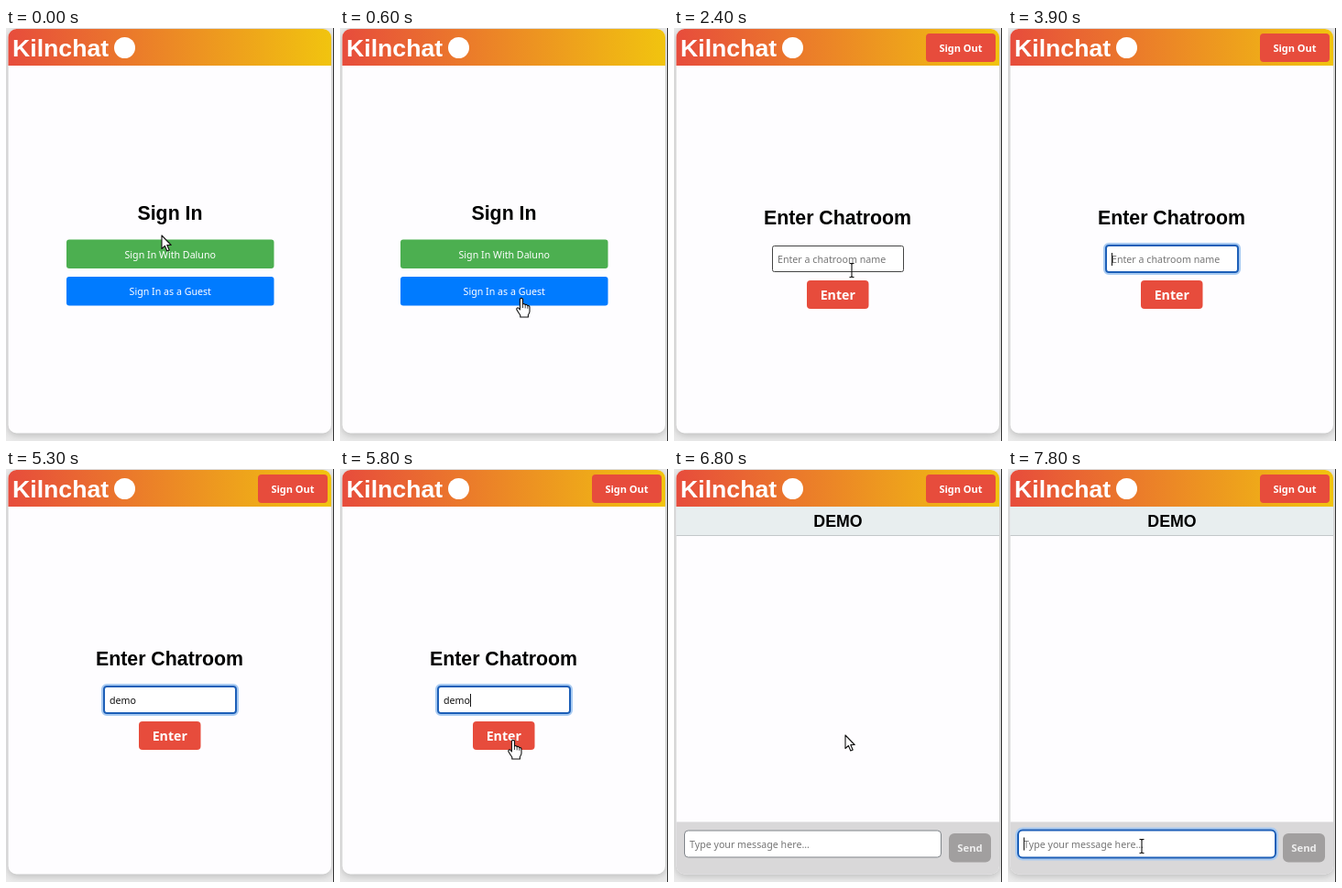
Recreate the animation shown at these times as an HTML page with a canvas. Size 358x450 px, loop 8000 ms.

```html
<!DOCTYPE html>
<html lang="en">
<head>
<meta charset="utf-8">
<title>Chat sign-in</title>
<style>
  html, body { margin: 0; width: 100%; height: 100%; overflow: hidden; background: #ebebeb; }
  canvas { display: block; width: 358px; height: 450px; }
</style>
</head>
<body>
<canvas id="stage"></canvas>
<script>
const W = 358, H = 450, LOOP = 8000, STEP = 100;
const canvas = document.getElementById('stage');
const ctx = canvas.getContext('2d');
const ratio = window.devicePixelRatio || 1;
canvas.width = W * ratio;
canvas.height = H * ratio;

const UI = '"Noto Sans", "Open Sans", sans-serif';
const HEAD = '"Liberation Sans", Arial, sans-serif';
const RED = '#e74c3c', PAPER = '#fefdff', GREY = '#757575';

// When things happen, in ms
const SIGNED_IN = 1400, FOCUS = 2900, TYPING = 3900, POINTER_BACK = 5400,
      BLUR = 6200, ENTERED = 6400, CHAT = 6700, CHAT_FOCUS = 7700;
const KEYS = [4000, 4300, 4400, 4600];

const account = { x: 66, y: 230.5, w: 226.5, h: 31.5 };
const guest = { x: 66, y: 271, w: 226.5, h: 31.5 };
const enter = { x: 145, y: 275, w: 67.5, h: 31 };
const signOut = { x: 275, y: 6, w: 76, h: 31 };
const roomField = { x: 107, y: 237, w: 144, h: 29 };
const messageField = { x: 11, y: 393.5, w: 281, h: 30 };
const send = { x: 300, y: 397, w: 46, h: 31.5 };

const moves = [
  { from: 0, to: 600, x: 198, y: 294 },
  { from: 1800, to: 2400, x: 194, y: 264 },
  { from: 5300, to: 5800, x: 189, y: 295 },
  { from: 6200, to: 6400, x: 187, y: 290 },
  { from: 7100, to: 7500, x: 146, y: 411 }
];

const ease = p => p * p * (3 - 2 * p);
const inside = (p, b) => p.x >= b.x && p.x <= b.x + b.w && p.y >= b.y && p.y <= b.y + b.h;

function box(b, radius, fill, stroke, width = 1, grow = 0) {
  ctx.beginPath();
  ctx.roundRect(b.x - grow, b.y - grow, b.w + 2 * grow, b.h + 2 * grow, radius);
  if (fill) { ctx.fillStyle = fill; ctx.fill(); }
  if (stroke) { ctx.strokeStyle = stroke; ctx.lineWidth = width; ctx.stroke(); }
}

function text(s, x, y, font, color, align = 'left') {
  ctx.font = font;
  ctx.fillStyle = color;
  ctx.textAlign = align;
  ctx.fillText(s, x, y);
}

function button(b, label, baseline, font, fill, color = '#fff', radius = 4) {
  box(b, radius, fill);
  text(label, b.x + b.w / 2, baseline, font, color, 'center');
}

function field(b, { value = '', hint, baseline, focused, hover, caret, radius = 2 }) {
  if (focused) {
    box(b, radius + 3, null, '#a9cbf2', 2, 2);
    box(b, radius + 1, '#fff', '#1c5fb8', 2);
  } else {
    box({ x: b.x + .5, y: b.y + .5, w: b.w - 1, h: b.h - 1 }, radius, '#fff', hover ? '#444' : '#80858a');
  }
  const left = b.x + 6;
  text(value || hint, left, baseline, `10.67px ${UI}`, value ? '#111' : GREY);
  if (caret) {
    const x = left + (value ? ctx.measureText(value).width : 0);
    ctx.fillStyle = '#111';
    ctx.fillRect(x, baseline - 11, 1, 14);
  }
}

function pointerAt(t) {
  const p = { x: 170, y: 226 };
  for (const m of moves) {
    if (t <= m.from) break;
    const k = ease(Math.min(1, (t - m.from) / (m.to - m.from)));
    p.x += (m.x - p.x) * k;
    p.y += (m.y - p.y) * k;
  }
  return p;
}

function pointerKind(t, p) {
  if (t < SIGNED_IN) return inside(p, account) || inside(p, guest) ? 'hand' : 'arrow';
  if (t < ENTERED) return inside(p, enter) ? 'hand' : inside(p, roomField) ? 'beam' : 'arrow';
  return t >= CHAT && inside(p, messageField) ? 'beam' : 'arrow';
}

const arrowPath = new Path2D('M0 0V14.5L3.4 11.4L5.8 17L8.2 16L5.8 10.5H10.2Z');
const handPath = new Path2D('M-1.6 1.4Q0 -.6 1.5 1.4V7Q3.2 5.9 4.2 7.6Q6 6.8 6.8 8.6Q8.8 8 9 10.2V15Q8.7 17 7.4 18.5V21H-1.2V19Q-3 16.6-5.2 12.8Q-5.3 10.4-3.2 11L-1.6 12.8Z');
const beamPath = new Path2D('M-2.5 -7.5H-.8L0 -6.7L.8 -7.5H2.5M0 -6.7V6.7M-2.5 7.5H-.8L0 6.7L.8 7.5H2.5');

function drawPointer(kind, p) {
  ctx.save();
  ctx.translate(p.x, p.y);
  ctx.strokeStyle = '#111';
  ctx.lineJoin = 'round';
  ctx.lineWidth = 1.1;
  if (kind === 'beam') {
    ctx.stroke(beamPath);
  } else {
    const path = kind === 'hand' ? handPath : arrowPath;
    ctx.fillStyle = '#fff';
    ctx.fill(path);
    ctx.stroke(path);
    if (kind === 'hand') {
      ctx.lineWidth = .8;
      ctx.stroke(new Path2D('M1.5 7V11M4.2 7.6V11.4M6.8 8.6V11.8'));
    }
  }
  ctx.restore();
}

function drawPage() {
  ctx.fillStyle = '#ebebeb';
  ctx.fillRect(0, 0, W, H);
  ctx.save();
  ctx.shadowColor = 'rgba(0,0,0,.22)';
  ctx.shadowBlur = 8 * ratio;
  ctx.shadowOffsetY = 2 * ratio;
  box({ x: 2.5, y: 1, w: 352.5, h: 440.5 }, 9, PAPER);
  ctx.restore();
  ctx.fillStyle = '#333';
  ctx.fillRect(357, 0, 1, H);
}

function drawHeader(signedIn) {
  const g = ctx.createLinearGradient(2, 0, 355, 0);
  g.addColorStop(0, RED);
  g.addColorStop(1, '#f1c40f');
  box({ x: 2.5, y: 1, w: 352.5, h: 40 }, [9, 9, 0, 0], g);
  text('Kilnchat', 7, 30.5, `bold 26.67px ${HEAD}`, '#fff');
  ctx.beginPath();
  ctx.arc(129.5, 21.5, 11.5, 0, Math.PI * 2);
  ctx.fill();
  if (signedIn) button(signOut, 'Sign Out', 25.5, `bold 11px ${UI}`, RED);
}

function drawSignIn() {
  text('Sign In', 179, 209, `bold 21.33px ${HEAD}`, '#000', 'center');
  button(account, 'Sign In With Daluno', 250.5, `10.67px ${UI}`, '#4caf50', '#fff', 3);
  button(guest, 'Sign In as a Guest', 291, `10.67px ${UI}`, '#007bff', '#fff', 3);
}

function drawRoomForm(t, pointer) {
  const typed = KEYS.filter(k => t >= k).length;
  const caret = t >= FOCUS && t < 3500 || t >= TYPING && t < 5100 || t >= 5600 && t < BLUR;
  text('Enter Chatroom', 178.5, 214, `bold 21.33px ${HEAD}`, '#000', 'center');
  field(roomField, {
    value: 'demo'.slice(0, typed), hint: 'Enter a chatroom name', baseline: 256,
    focused: t >= FOCUS && t < BLUR, hover: inside(pointer, roomField), caret
  });
  button(enter, 'Enter', 296, `bold 14.2px ${UI}`, RED);
}

function drawChat(t) {
  ctx.fillStyle = '#e8eeef';
  ctx.fillRect(2.5, 41, 352.5, 31);
  ctx.fillStyle = '#c3c8ca';
  ctx.fillRect(2.5, 72, 352.5, 1);
  text('DEMO', 179, 62.5, `bold 17.8px ${HEAD}`, '#000', 'center');
  box({ x: 2.5, y: 384.5, w: 352.5, h: 57 }, [0, 0, 9, 9], '#d9d8d9');
  const focused = t >= CHAT_FOCUS;
  field(messageField, {
    hint: 'Type your message here...', baseline: 412.5, focused, caret: focused, radius: 4
  });
  button(send, 'Send', 417, `bold 11.3px ${UI}`, '#a19f9f', '#eee', 6);
}

function draw(t) {
  const pointer = pointerAt(t);
  ctx.setTransform(ratio, 0, 0, ratio, 0, 0);
  drawPage();
  drawHeader(t >= SIGNED_IN);
  if (t < SIGNED_IN) drawSignIn();
  else if (t < CHAT) drawRoomForm(t, pointer);
  else drawChat(t);
  if (t < TYPING || t >= POINTER_BACK) drawPointer(pointerKind(t, pointer), pointer);
}

const start = performance.now();
function tick() {
  const t = (performance.now() - start) % LOOP;
  draw(Math.floor(t / STEP) * STEP);
  requestAnimationFrame(tick);
}
tick();
</script>
</body>
</html>
```
